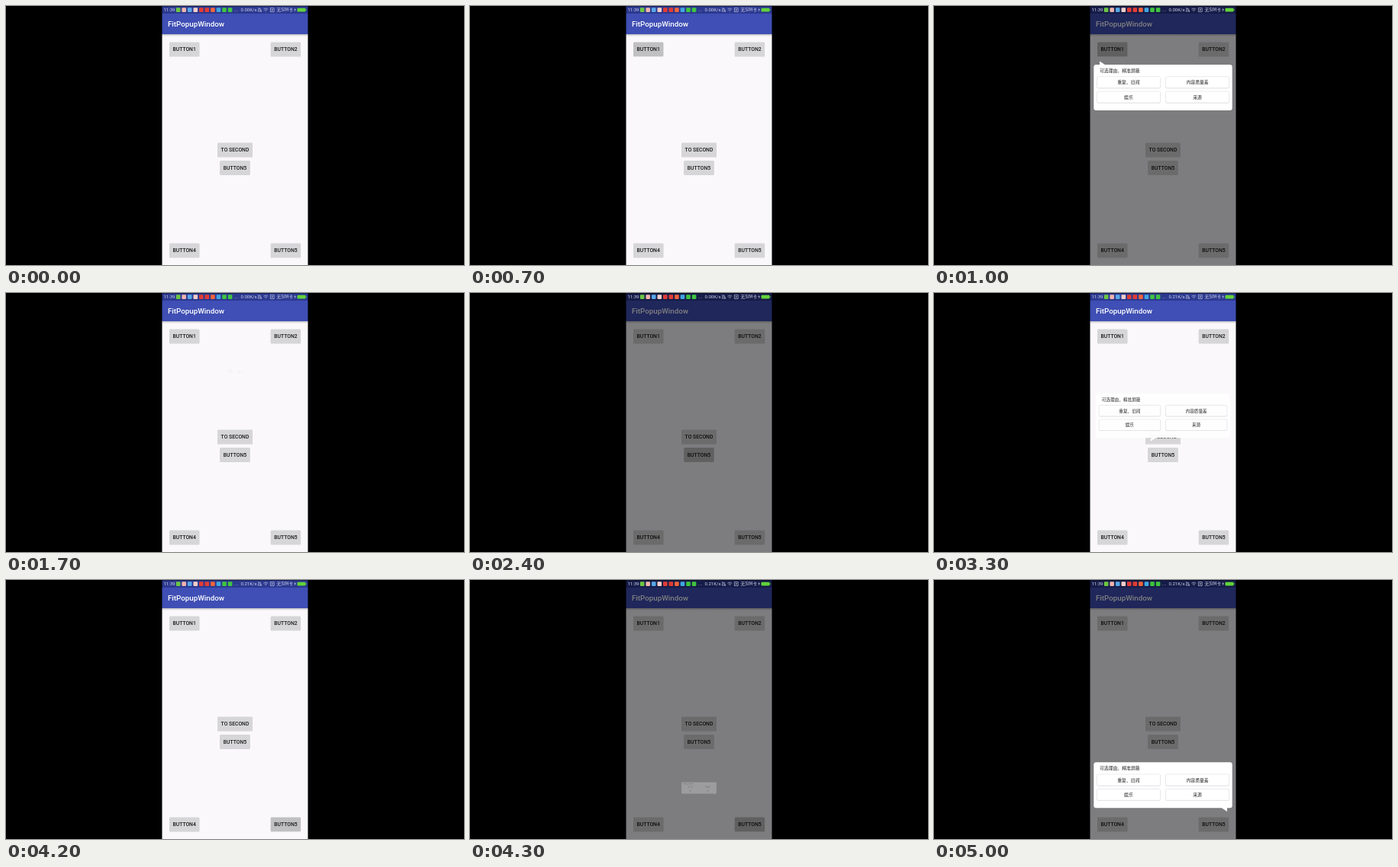
An HTML page for the animation above (5100 ms loop, 600 by 340 pixels).

```html
<!DOCTYPE html>
<html lang="en">
<head>
<meta charset="utf-8">
<title>Popup demo</title>
<style>
  html, body { margin: 0; width: 100%; height: 100%; overflow: hidden; background: #000; }
  svg { display: block; width: 600px; height: 340px; }
  text { font-family: Roboto, sans-serif; }
  .cjk { font-family: "Noto Sans CJK SC", "Noto Sans CJK", sans-serif; font-size: 5.85px; fill: #222; }
  .button { font-size: 6.8px; font-weight: 500; fill: #1c1c1c; text-anchor: middle; }
  .status { font-size: 6px; fill: #d5d9ee; }
</style>
</head>
<body>
<svg viewBox="0 0 600 340">
  <defs>
    <linearGradient id="shade" x2="0" y2="1">
      <stop stop-color="#000" stop-opacity=".24"/>
      <stop offset="1" stop-color="#000" stop-opacity="0"/>
    </linearGradient>
  </defs>
  <rect width="600" height="340"/>
  <g id="screen">
    <rect x="204.5" y="37" width="191" height="303" fill="#faf8fb"/>
    <rect x="204.5" y=".4" width="191" height="9.6" fill="#2c3990"/>
    <rect x="204.5" y="10" width="191" height="27" fill="#3f4fb5"/>
    <rect x="204.5" y="37" width="191" height="3" fill="url(#shade)"/>
    <text x="212" y="27" font-size="9.75" font-weight="500" fill="#fff">FitPopupWindow</text>
    <g id="buttons"></g>
    <g id="presses"></g>
  </g>
  <g id="status">
    <text class="status" x="206.5" y="7.4">11:39</text>
    <text class="status" x="298.5" y="7.4" letter-spacing=".6">...</text>
    <text class="status" id="speed" x="307.5" y="7.4"></text>
    <g fill="none" stroke="#d5d9ee" stroke-width=".6">
      <path d="M330 7h4.6q-.8-.8-.8-2.4a1.5 1.5 0 0 0-3 0q0 1.6-.8 2.4M330 2.2l5 5.6"/>
      <path d="M337.4 4.2q2.9-2.4 5.8 0M338.6 5.7q1.7-1.4 3.4 0M340.3 6.6v1"/>
      <path d="M346.4 2.6h4.8v5h-4.8zM347.7 3.9l2.2 2.4m0-2.4l-2.2 2.4"/>
    </g>
    <text class="cjk" x="354.5" y="7.3" style="fill:#d5d9ee">无SIM卡</text>
    <path d="M379 2.5l-1.6 2.7h1.3l-.8 2.5 2-3.2h-1.3z" fill="#d5d9ee"/>
    <rect x="381.5" y="2.8" width="11" height="4.6" rx="1" fill="#62d33a"/>
    <rect x="392.6" y="4.2" width="1" height="1.8" fill="#62d33a"/>
  </g>
  <g id="popups"></g>
</svg>
<script>
const LOOP = 5100, STEP = 100, OPEN_MS = 200, CLOSE_MS = 130;
const $ = id => document.getElementById(id);

const button = (x, y, label, w = 39.3) => `
  <rect x="${x}" y="${y + .6}" width="${w}" height="18.5" rx="1.2" fill="#000" opacity=".16"/>
  <rect x="${x}" y="${y}" width="${w}" height="18.5" rx="1.2" fill="#d6d5d7"/>
  <text class="button" x="${x + w / 2}" y="${y + 11.8}">${label}</text>`;

$("buttons").innerHTML =
  button(214, 47.5, "BUTTON1") + button(346.8, 47.5, "BUTTON2") +
  button(277, 179.5, "TO SECOND", 46) + button(280.3, 203, "BUTTON5") +
  button(214, 311.5, "BUTTON4") + button(346.8, 311.5, "BUTTON5");

const iconColors = ["#6cc644", "#f0b4ae", "#58a8e8", "#f3cfca", "#e03c36",
                    "#e03c36", "#f0643c", "#42a5e0", "#3fc53f", "#3fc53f"];
$("status").innerHTML += iconColors.map((color, i) =>
  `<rect x="${222.8 + i * 7.55}" y="2.3" width="5.6" height="5.6" rx=".8" fill="${color}"/>`).join("");

const choice = (x, y, label) => `
  <rect x="${x}" y="${y + .5}" width="83.3" height="15" rx="2" fill="#d4d4da"/>
  <rect x="${x}" y="${y}" width="83.3" height="15" rx="2" fill="#fff" stroke="#e2e2e8" stroke-width=".7"/>
  <text class="cjk" x="${x + 41.6}" y="${y + 9.6}" text-anchor="middle">${label}</text>`;

const panel = `
  <rect x="209.3" width="181.4" height="60" rx="3" fill="#fff"/>
  <text class="cjk" x="217" y="10.2">可选理由，精准屏蔽</text>` +
  choice(213.3, 15.7, "重复、旧闻") + choice(303.5, 15.7, "内容质量差") +
  choice(213.3, 35, "娱乐") + choice(303.5, 35, "来源");

// pivot: scaling centre below the panel's top; press: corner of the tapped button
const popups = [
  { top: 77, pivot: 26, arrow: "M217-4.6V1h8.5z", press: [214, 47.5],
    touch: 300, open: 782, release: 1700, close: 1601 },
  { top: 131, pivot: 35, arrow: "M283 64.6V59h8.5z", press: [280.3, 203],
    touch: 2300, open: 2382, release: 2600, close: 3285 },
  { top: 239.3, pivot: 35, arrow: "M384 64.6V59h-8.5z", press: [346.8, 311.5],
    touch: 4200, open: 4233, release: 4700, close: Infinity },
];
$("popups").innerHTML = popups.map(p =>
  `<g><path d="${p.arrow}" fill="#fff"/>${panel}</g>`).join("");
$("presses").innerHTML = popups.map(({ press: [x, y] }) =>
  `<rect x="${x}" y="${y}" width="39.3" height="18.5" rx="1.2" opacity="0"/>`).join("");
popups.forEach((p, i) => {
  p.node = $("popups").children[i];
  p.shadow = $("presses").children[i];
});

const ease = x => (1 - Math.cos(Math.PI * Math.min(1, Math.max(0, x)))) / 2;

function draw(now) {
  const t = Math.floor(now % LOOP / STEP) * STEP;
  for (const p of popups) {
    const size = ease((t - p.open) / OPEN_MS) - ease((t - p.close) / CLOSE_MS);
    p.node.setAttribute("opacity", size);
    p.node.setAttribute("transform",
      `translate(300 ${p.top + p.pivot}) scale(${size}) translate(-300 ${-p.pivot})`);
    p.shadow.setAttribute("opacity", t >= p.touch && t < p.release ? .1 : 0);
  }
  const dimmed = popups.some(p => t >= p.open && t < p.close);
  $("screen").setAttribute("opacity", dimmed ? .5 : 1);
  $("speed").textContent = t < 3000 ? "0.00K/s" : "0.21K/s";
}

const start = performance.now();
function tick() {
  draw(performance.now() - start);
  requestAnimationFrame(tick);
}
tick();
</script>
</body>
</html>
```
